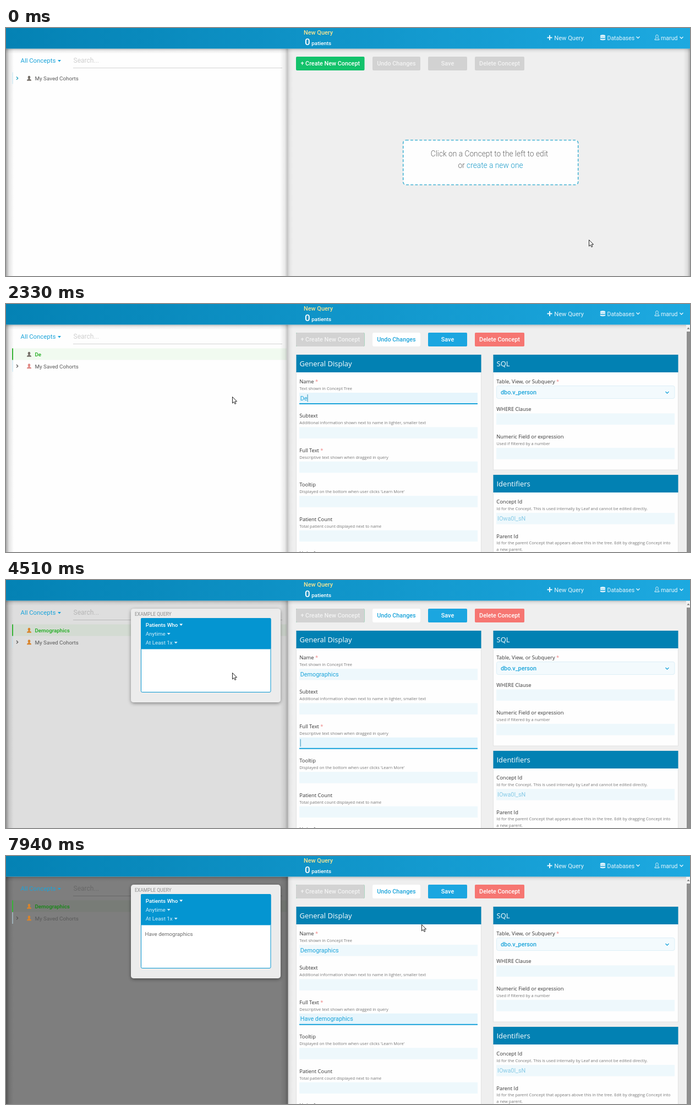
These frames come from a looping animation (1243 by 450 pixels, 8000 ms). An HTML page:

```html
<!DOCTYPE html>
<html lang="en">
<head>
<meta charset="utf-8">
<title>Concept editor</title>
<style>
html, body { margin: 0; width: 100%; height: 100%; overflow: hidden; background: #efefef; }
svg { display: block; width: 1243px; height: 450px; }
text { font-family: Roboto, "Liberation Sans", sans-serif; white-space: pre; }
.ui { font-family: "Open Sans", "Noto Sans", sans-serif; }
.mid { text-anchor: middle; }
.bold { font-weight: 500; }
.thin { font-weight: 300; }
.line { fill: none; stroke-width: 1.3; }
</style>
</head>
<body>
<svg id="stage" viewBox="0 0 1243 450"></svg>
<script>
const LOOP = 8000;
const BLUE = '#1ba4da';
const DEEP = '#0281b3';
const INPUT = 10.85;

const rect = (x, y, w, h, fill, more = '') =>
  `<rect x="${x}" y="${y}" width="${w}" height="${h}" fill="${fill}" ${more}/>`;
const text = (x, y, size, fill, str, more = '') =>
  `<text x="${x}" y="${y}" font-size="${size}" fill="${fill}" ${more}>${str}</text>`;
const group = (id, body) => `<g id="${id}">${body}</g>`;
const chevron = (x, y, color) =>
  `<path class="line" stroke="${color}" d="M${x} ${y}l3 3 3-3"/>`;
const triangle = (x, y, color) => `<path fill="${color}" d="M${x} ${y}h6l-3 3.4z"/>`;
const person = (x, y, more) =>
  `<path ${more} d="M${x} ${y + 9}c0-2 1-2.6 3-3.2-2-2.4-1.500-5.800 1-5.800s3 3.400 1 5.800c2 .6 3 1.200 3 3.200z"/>`;

const shade = (id, dir, dark) =>
  `<linearGradient id="${id}" ${dir}><stop stop-opacity="${dark}"/>
   <stop offset=".4" stop-opacity="${dark * .3}"/><stop offset="1" stop-opacity="0"/></linearGradient>`;

const defs = `<defs>
  <linearGradient id="bar"><stop stop-color="#0482b4"/><stop offset="1" stop-color="#1da9e0"/></linearGradient>
  ${shade('fromLeft', '', .34)}
  ${shade('fromRight', 'x1="1" x2="0"', .26)}
  ${shade('fromTop', 'x2="0" y2="1"', .26)}
  <filter id="drop" x="-10%" y="-10%" width="120%" height="125%">
    <feDropShadow dx="0" dy="2" stdDeviation="3" flood-opacity=".4"/></filter>
</defs>`;

function header() {
  const pale = '#e6f5fc';
  return rect(0, 0, 1243, 37.5, 'url(#bar)')
    + text(567.5, 12, 10.9, '#f6e593', 'New Query', 'class="mid bold"')
    + text(543, 31, 17, '#fff', '0', 'class="bold"')
    + text(555.3, 31, 9.9, '#fff', 'patients', 'class="bold"')
    + `<path d="M988 13v9M983.500 17.500h9" stroke="${pale}" stroke-width="2"/>`
    + text(996.3, 22, 11.1, pale, 'New Query')
    + `<g fill="${pale}"><ellipse cx="1084.500" cy="14" rx="4.700" ry="1.800"/>
       <path d="M1079.800 15.300q4.700 2.200 9.400 0v2.200q-4.700 2.200-9.400 0zM1079.800 19q4.700 2.200 9.400 0v2.200q-4.700 2.200-9.400 0z"/></g>`
    + text(1092.5, 22, 10.5, pale, 'Databases') + chevron(1145.5, 15.5, pale)
    + person(1179, 12.5, `class="line" stroke="${pale}" style="stroke-width:1"`)
    + text(1190, 22, 10.6, pale, 'marud') + chevron(1224.5, 16, pale);
}

function leftPane() {
  return rect(0, 37.5, 512.5, 412.5, '#fefefe')
    + text(122.5, 62.5, 12, '#cfcfcf', 'Search...')
    + rect(122, 72, 380, 1, '#d2d2d2')
    + group('rowBack', rect(11, 80.5, 499, 21, '#f1faf0'))
    + rect(0, 37.5, 14, 412.5, 'url(#fromLeft)')
    + rect(498, 37.5, 14.5, 412.5, 'url(#fromRight)')
    + rect(0, 37.5, 512.5, 9, 'url(#fromTop)')
    + rect(0, 37.5, 512.5, 412.5, '#000', 'id="dim"')
    + text(26.5, 63, 11.35, BLUE, 'All Concepts') + triangle(94, 58, BLUE)
    + group('cohorts', rect(11.5, 80.500, 1, 21, '#bfe4f2')
      + '<path id="arrow" class="line" d="M19 88.500l2.700 2.700-2.700 2.700"/>'
      + text(52.5, 95, 9.8, '#5a5a5a', 'My Saved Cohorts'))
    + group('chosen', rect(11, 80.500, 2, 21, '#37b337')
      + text(52.5, 95, 9.75, '#1cab1c', '', 'id="label" class="bold"'))
    + person(38, 86.800, 'id="icon1"') + person(38, 108.3, 'id="icon2"');
}

function popover() {
  const item = (y, str, end, color, more = '') =>
    text(253.7, y, 9.85, color, str, more) + triangle(end, y - 5, color);
  return rect(227, 52, 272, 170, '#ececec', 'rx="5" filter="url(#drop)"')
    + text(234, 65, 8.55, '#8c8c8c', 'EXAMPLE QUERY')
    + rect(245.5, 69.5, 235.5, 134, '#fff', 'rx="2" stroke="#0495d1"')
    + rect(245, 69, 236.5, 56.5, '#0495d1', 'rx="2"')
    + item(84.5, 'Patients Who', 315.2, '#fff', 'class="bold"')
    + item(101, 'Anytime', 292.7, '#d3eefa')
    + item(117, 'At Least 1x', 305.7, '#d3eefa')
    + text(252.5, 145, 9.83, '#6a6a6a', '', 'id="preview"');
}

const button = (x, w, str, back, fore) =>
  rect(x, 52, w, 25, back, 'rx="2"')
  + text(x + w / 2, 68.2, 10.8, fore, str, 'class="mid bold"');

function buttons(colors) {
  const spec = [[527, 124.5, '+ Create New Concept'], [666, 87, 'Undo Changes'],
    [767, 71, 'Save'], [852, 90, 'Delete Concept']];
  return spec.map(([x, w, str], i) => button(x, w, str, ...colors[i])).join('');
}

const label = (x, y, str, must) =>
  text(x, y, 9.4, '#333', str + (must ? ' <tspan fill="#ee7f7f">*</tspan>' : ''), 'class="ui"');
const hint = (x, y, str) => text(x, y, 7.5, '#777', str, 'class="ui"');
const field = (x, y) => rect(x, y, 324, 20.5, '#eef8fc');
const card = (x, y, h, title) =>
  rect(x, y, 336, h, '#fefefe', 'stroke="#e2e2e2"')
  + rect(x, y, 336, 32, DEEP)
  + text(x + 6, y + 21.3, 13, '#fff', title, 'class="ui"');

function form() {
  const rows = [
    ['Name', 'Text shown in Concept Tree', 1],
    ['Subtext', 'Additional information shown next to name in lighter, smaller text'],
    ['Full Text', 'Descriptive text shown when dragged in query', 1],
    ['Tooltip', "Displayed on the bottom when user clicks 'Learn More'"],
    ['Patient Count', 'Total patient count displayed next to name'],
    ['Units for measurement', '']];
  const general = rows.map(([name, note, must], i) => {
    const y = 144 + i * 62.4;
    return label(533.3, y, name, must) + hint(533.3, y + 12, note) + field(533, y + 17);
  }).join('');
  const x = 891.3;
  return card(527.5, 92, 370, 'General Display') + general
    + card(885.5, 92, 209, 'SQL')
    + label(x, 144, 'Table, View, or Subquery', 1)
    + rect(891.5, 148.500, 323.5, 23, '#f3fafd', 'rx="3" stroke="#dceff7"')
    + text(899, 164, 10.8, BLUE, 'dbo.v_person', 'class="bold"') + chevron(1198.5, 159, BLUE)
    + label(x, 193.5, 'WHERE Clause') + field(891, 198.5)
    + label(x, 244, 'Numeric Field or expression')
    + hint(x, 256, 'Used if filtered by a number') + field(891, 261)
    + card(885.5, 310, 160, 'Identifiers')
    + label(x, 362, 'Concept Id')
    + hint(x, 374, 'Id for the Concept. This is used internally by Leaf and cannot be edited directly.')
    + field(891, 379) + text(893, 393, 10.8, '#86cae6', 'IOwa0l_sN')
    + label(x, 424.5, 'Parent Id')
    + hint(x, 436, 'Id for the parent Concept that appears above this in the tree. Edit by dragging Concept into')
    + hint(x, 447.500, 'a new parent.')
    + rect(1236, 38, 7, 412, '#f1f1f1') + rect(1237, 50, 6, 400, '#8f8f8f')
    + '<path fill="#777" d="M1237.500 45.500h5l-2.500-3z"/>'
    + group('focus', rect(533, 161, 324, 20, '#e6f5fc') + rect(533, 180, 324, 2, BLUE))
    + rect(535, 164, 0, 13, '#2f8fdc', 'id="mark"')
    + text(534.7, 174.600, INPUT, BLUE, '', 'id="name"')
    + text(534.7, 299.300, INPUT, BLUE, '', 'id="full"')
    + rect(0, 164, 1, 13.5, '#2b8fb8', 'id="caret"');
}

function empty() {
  const size = 13.75;
  return rect(721.7, 203.5, 318, 81, '#fefefe',
      'rx="5" stroke="#45b3d3" stroke-width="1.600" stroke-dasharray="5 3.200"')
    + text(878.5, 233, size, '#666', 'Click on a Concept to the left to edit', 'class="mid thin"')
    + text(880.5, 253.5, size, '#666', 'or <tspan fill="#1a9bc9">create a new one</tspan>', 'class="mid thin"')
    + rect(1231, 37.500, 12, 413, 'url(#fromRight)');
}

const off = ['#d2d2d2', '#f3f3f3'];
const stage = document.getElementById('stage');
stage.innerHTML = defs
  + rect(512.5, 37.5, 731, 413, '#efefef')
  + rect(512.5, 37.5, 9, 413, 'url(#fromLeft)', 'opacity=".4"')
  + rect(512.5, 37.5, 731, 8, 'url(#fromTop)', 'opacity=".8"')
  + group('empty', empty()) + group('form', form())
  + group('idle', buttons([['#13c26b', '#fff'], off, off, off]))
  + group('active', buttons([off, ['#fff', BLUE], ['#1ba6e0', '#fff'], ['#f67672', '#fff']]))
  + leftPane() + group('popover', popover()) + header()
  + group('pointer', `<path id="arrowCur" fill="#fff" stroke="#222" d="M.5.5v11.500l2.700-2.500 1.800 4 1.900-.900-1.800-3.800h3.500z"/>
    <path id="beamCur" class="line" stroke="#222" style="stroke-width:1" d="M-2.500-5.500h2l.5.5.5-.5h2M0-5v10M-2.500 5.500h2l.5-.5.5.5h2"/>
    <path id="handCur" fill="#fff" stroke="#222" d="M0 0q1.500-1 2 1v4l5 1.200q1.500.5 1.300 2l-.800 5h-6l-4-5q0-2 2.500-.5z"/>`);

const ui = {};
stage.querySelectorAll('[id]').forEach(el => { ui[el.id] = el; });
const show = (el, on) => { el.style.display = on ? '' : 'none'; };
const move = (el, x, y) => el.setAttribute('transform', `translate(${x} ${y})`);
const clamp = v => Math.min(1, Math.max(0, v));

const pen = document.createElement('canvas').getContext('2d');
const widthOf = str => {
  pen.font = `${INPUT}px Roboto, "Liberation Sans", sans-serif`;
  return pen.measureText(str).width;
};

// [time, letters typed so far]
const nameKeys = [[2100, 1], [2330, 2], [2400, 3], [2480, 4], [2710, 5], [2940, 6],
  [3110, 7], [3180, 8], [3260, 10], [3410, 11], [3490, 12]];
const fullKeys = [[5210, 1], [5370, 2], [5440, 3], [5520, 4], [5670, 5], [5900, 6], [6070, 7],
  [6220, 8], [6290, 9], [6370, 10], [6550, 11], [6620, 12], [6700, 14], [6850, 15], [6930, 16], [7080, 17]];
const typed = (keys, t) => keys.reduce((n, [at, count]) => (t >= at ? count : n), 0);

// the pointer moves in bursts of evenly held steps: start, end, steps
const bursts = [[70, 840, 11], [940, 1700, 11], [7630, 7940, 5]];
function held(t) {
  let at = 0;
  for (const [a, b, n] of bursts) {
    const gap = (b - a) / (n - 1);
    if (t >= a) at = Math.min(b, a + Math.floor((t - a) / gap + 1e-6) * gap);
  }
  return at;
}

const route = [[0, 1059, 384], [640, 600, 66], [860, 600, 66], [1320, 648, 175],
  [1400, 648, 175], [1700, 411, 168], [7555, 411, 168], [7940, 755, 124]];
function pointerAt(t) {
  const i = Math.max(1, route.findIndex(k => k[0] >= t));
  const [a, ax, ay] = route[i - 1], [b, bx, by] = route[i];
  const p = clamp((t - a) / (b - a)), e = p * p * (3 - 2 * p);
  return [ax + (bx - ax) * e, ay + (by - ay) * e];
}

// the CSS "ease" curve
function ease(x) {
  let lo = 0, hi = 1, u = .5;
  for (let i = 0; i < 20; i++) {
    u = (lo + hi) / 2;
    const v = 1 - u;
    if (.75 * v * v * u + .75 * v * u * u + u * u * u < x) lo = u; else hi = u;
  }
  const v = 1 - u;
  return .3 * v * v * u + 3 * v * u * u + u * u * u;
}

function draw(t) {
  const opened = t >= 763, sorted = t >= 2100, query = t >= 4420;
  const name = sorted ? 'Demographics'.slice(0, typed(nameKeys, t)) : 'New Concept';
  const full = 'Have demographics'.slice(0, typed(fullKeys, t));
  const low = 21.5;

  show(ui.empty, !opened);
  show(ui.form, opened);
  ui.active.style.opacity = clamp((t - 763) / 300);

  show(ui.rowBack, opened);
  show(ui.chosen, opened);
  show(ui.icon2, opened);
  [ui.rowBack, ui.chosen].forEach(el => move(el, 0, sorted ? 0 : low));
  move(ui.cohorts, 0, sorted ? low : 0);
  ui.arrow.setAttribute('stroke', sorted ? '#555' : '#1a9fbd');
  ui.icon1.setAttribute('fill', query ? '#d9842b' : '#76706a');
  ui.icon2.setAttribute('fill', query ? '#d9842b' : '#e08a86');
  ui.label.textContent = ui.name.textContent = name;
  ui.full.textContent = ui.preview.textContent = full;

  const fade = query ? ease(clamp((t - 4420) / 500)) : 0;
  ui.dim.setAttribute('opacity', fade / 2);
  ui.label.setAttribute('fill', fade > .5 ? '#148814' : '#1cab1c');
  show(ui.popover, query);

  const line = query ? 2 : t >= 4270 ? 1 : 0;
  show(ui.focus, t >= 1470);
  move(ui.focus, 0, line * 62.4);
  const lit = sorted && t < 4040 || t >= 4270 && t < 4970 || t >= 5210 && t < 7630;
  show(ui.caret, lit);
  ui.caret.setAttribute('x', 534.7 + widthOf([name, '', full][line]));
  move(ui.caret, 0, line * 62.4);

  const s = held(t), [x, y] = pointerAt(s);
  const beam = s >= 1240 && s < 1699, hand = s >= 600 && s < 940;
  move(ui.pointer, x, y);
  show(ui.beamCur, beam);
  show(ui.handCur, hand);
  show(ui.arrowCur, !beam && !hand);

  const from = Math.max(534.7, x), end = 534.7 + widthOf(name);
  const picked = s > 1400 && !sorted && from < end;
  show(ui.mark, picked);
  if (picked) {
    ui.mark.setAttribute('x', from);
    ui.mark.setAttribute('width', end - from);
  }
  ui.name.setAttribute('fill', picked ? '#fff' : BLUE);
}

const start = performance.now();
function tick() {
  draw((performance.now() - start) % LOOP);
  requestAnimationFrame(tick);
}
tick();
</script>
</body>
</html>
```
